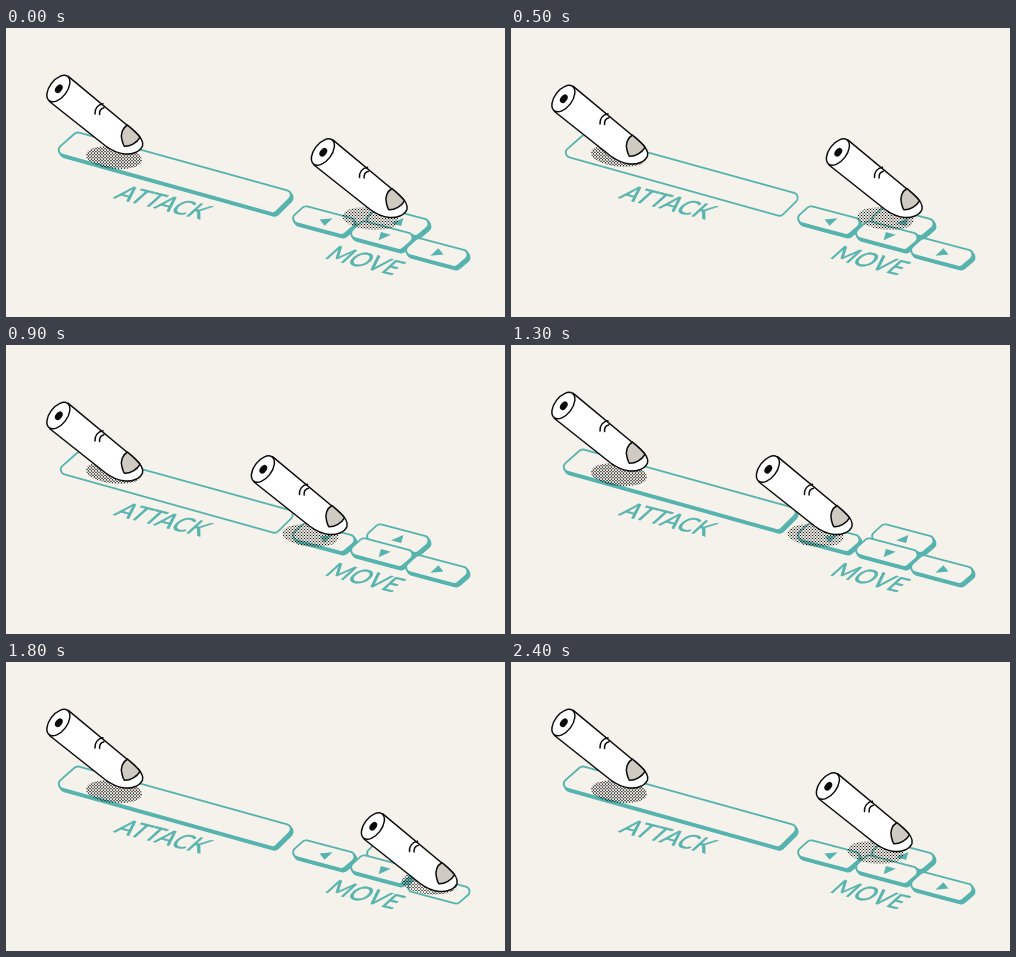
Recreate the animation shown at these times as an HTML page with a canvas. Size 499 by 289 pixels, loop 2.5 s.

```html
<!DOCTYPE html>
<html lang="en">
<head>
<meta charset="utf-8">
<title>Keyboard controls</title>
<style>
html, body { margin: 0; width: 100%; height: 100%; overflow: hidden; background: #f5f2eb; }
canvas { display: block; width: 499px; height: 289px; }
</style>
</head>
<body>
<canvas id="stage"></canvas>
<script>
const W = 499, H = 289, LOOP = 2500, STEP = 100;
const PAPER = '#f5f2eb', TEAL = '#57b3ae', INK = '#0b0b0b', NAIL = '#cfcbc3';
const canvas = document.getElementById('stage');
const ctx = canvas.getContext('2d');
const ratio = window.devicePixelRatio || 1;
canvas.width = W * ratio;
canvas.height = H * ratio;

// Raised faces, corners in the order left, top, right, bottom
const BAR = [[47.5, 124.2], [70.5, 104], [289.5, 164.6], [268, 185.6]];
const SMALL = [[282, 192.8], [298.5, 177.8], [354, 192.4], [336.5, 207.4]];
const SINK = [2, 2.7];

// Axes of the keyboard plane, and the way each arrow points on it
const ALONG = [1, 0.27], AWAY = [0.8, -0.75];
const KEYS = [
  { name: 'up', dx: 74, dy: 1, dir: [0, 1] },
  { name: 'left', dx: 0, dy: 0, dir: [-1, 0] },
  { name: 'down', dx: 58, dy: 15, dir: [0, -1] },
  { name: 'right', dx: 113, dy: 32, dir: [1, 0] }
];

// Moving hand: start time, x, y, pressed key
const MOVES = [
  [0, 0, 0], [100, 5, 0], [200, 10, 0], [300, 10, 10, 'up'], [500, 10, 0],
  [600, 0, 0], [700, -20, 0], [800, -40, 0], [900, -60, 0],
  [1100, -60, 10, 'left'], [1300, -60, 0], [1500, -20, 0], [1600, 20, 10],
  [1700, 50, 30], [1800, 50, 40, 'right'], [2200, 50, 30], [2300, 20, 10], [2400, 0, 0]
];

function poseAt(t) {
  const [, x, y, key] = MOVES.filter(m => m[0] <= t).pop();
  return { x, y, key };
}

function tapping(t) {
  const odd = Math.floor(t / STEP) % 2 === 1;
  return odd && (t < 1000 || (t >= 1500 && t < 1800));
}

function roundPoly(pts, dx, dy, r) {
  const p = pts.map(([x, y]) => [x + dx, y + dy]);
  const n = p.length, last = p[n - 1];
  ctx.beginPath();
  ctx.moveTo((last[0] + p[0][0]) / 2, (last[1] + p[0][1]) / 2);
  p.forEach((a, i) => ctx.arcTo(...a, ...p[(i + 1) % n], r));
  ctx.closePath();
}

function drawKey(face, dx, dy, down) {
  ctx.strokeStyle = ctx.fillStyle = TEAL;
  ctx.lineWidth = 1.8;
  if (!down) {
    for (let k = 1; k > 0; k -= 0.25) {
      roundPoly(face, dx + SINK[0] * k, dy + SINK[1] * k, 5);
      ctx.fill();
      ctx.stroke();
    }
  }
  roundPoly(face, dx + (down ? SINK[0] : 0), dy + (down ? SINK[1] : 0), 5);
  ctx.fillStyle = PAPER;
  ctx.fill();
  ctx.stroke();
}

function drawArrow([a, b], x, y) {
  const corners = [[5.5, 0], [-3.6, 5], [-3.6, -5]];
  ctx.beginPath();
  for (const [f, s] of corners) {
    const u = a * f - b * s, v = b * f + a * s;
    ctx.lineTo(x + u * ALONG[0] + v * AWAY[0], y + u * ALONG[1] + v * AWAY[1]);
  }
  ctx.fillStyle = TEAL;
  ctx.fill();
}

function drawLabel(text, x, y) {
  ctx.save();
  ctx.transform(1, 0.25, -0.83, 0.75, x, y);
  ctx.font = '400 23.5px Lato, sans-serif';
  ctx.fillStyle = ctx.strokeStyle = TEAL;
  ctx.lineWidth = 0.5;
  ctx.fillText(text, 0, 0);
  ctx.strokeText(text, 0, 0);
  ctx.restore();
}

function drawShadow(cx, cy) {
  ctx.save();
  ctx.translate(cx, cy);
  ctx.beginPath();
  ctx.ellipse(0, 0, 28.2, 11.2, 0.1, 0, Math.PI * 2);
  ctx.clip();
  ctx.beginPath();
  for (let row = -8; row <= 8; row++) {
    for (let x = -30 + (row & 1) * 1.5; x <= 30; x += 3) {
      ctx.rect(x - 0.6, row * 1.5 - 0.6, 1.2, 1.2);
    }
  }
  ctx.fillStyle = INK;
  ctx.fill();
  ctx.restore();
}

function paint(path, fill) {
  const p = new Path2D(path);
  if (fill) {
    ctx.fillStyle = fill;
    ctx.fill(p);
  }
  ctx.stroke(p);
}

function ellipse(x, y, rx, ry, fill) {
  ctx.beginPath();
  ctx.ellipse(x, y, rx, ry, 0.65, 0, Math.PI * 2);
  ctx.fillStyle = fill;
  ctx.fill();
}

function drawFinger(x, y) {
  ctx.save();
  ctx.translate(x, y);
  ctx.strokeStyle = INK;
  ctx.lineWidth = 1.5;
  ctx.lineCap = ctx.lineJoin = 'round';
  paint('M62 48.2 L128 103 C134 108 137.7 113 136.5 118 C134 124 126 126.5 119 126 C111 125.3 105 122 99 117.5 L43.5 73.5 Z', '#fff');
  paint('M121.5 97 C116.5 99.8 114.2 106 116 112 C116.6 114.6 117.2 117 118.4 118.3 C124.5 118.5 131 114.5 134 109.3 C131 105 126 101 121.5 97 Z', NAIL);
  paint('M97 75.8 C92 76.5 88.5 80.5 89 86');
  paint('M98 79.7 C95 80.3 93.3 83 93.6 86.5');
  ellipse(52.4, 60.6, 8.7, 15.2, '#fff');
  ctx.stroke();
  ellipse(52.8, 60.8, 3.2, 4.8, INK);
  ctx.restore();
}

function draw(t) {
  const tap = tapping(t), { x, y, key } = poseAt(t);
  ctx.setTransform(ratio, 0, 0, ratio, 0, 0);
  ctx.fillStyle = PAPER;
  ctx.fillRect(0, 0, W, H);

  drawKey(BAR, 0, 0, tap);
  for (const { name, dx, dy, dir } of KEYS) {
    const down = key === name;
    drawKey(SMALL, dx, dy, down);
    drawArrow(dir, 319 + dx + (down ? SINK[0] : 0), 193 + dy + (down ? SINK[1] : 0));
  }
  drawLabel('ATTACK', 107, 169.7);
  drawLabel('MOVE', 317.5, 230);

  drawShadow(108, tap ? 127.3 : 129.7);
  drawShadow(x + (key ? 373.5 : 364.5), y + (key ? 181 : 190.5));
  drawFinger(0, tap ? 10 : 0);
  drawFinger(x + 264.5, y + 63.5);
}

const start = performance.now();
function tick() {
  draw((performance.now() - start) % LOOP);
  requestAnimationFrame(tick);
}
tick();
</script>
</body>
</html>
```
